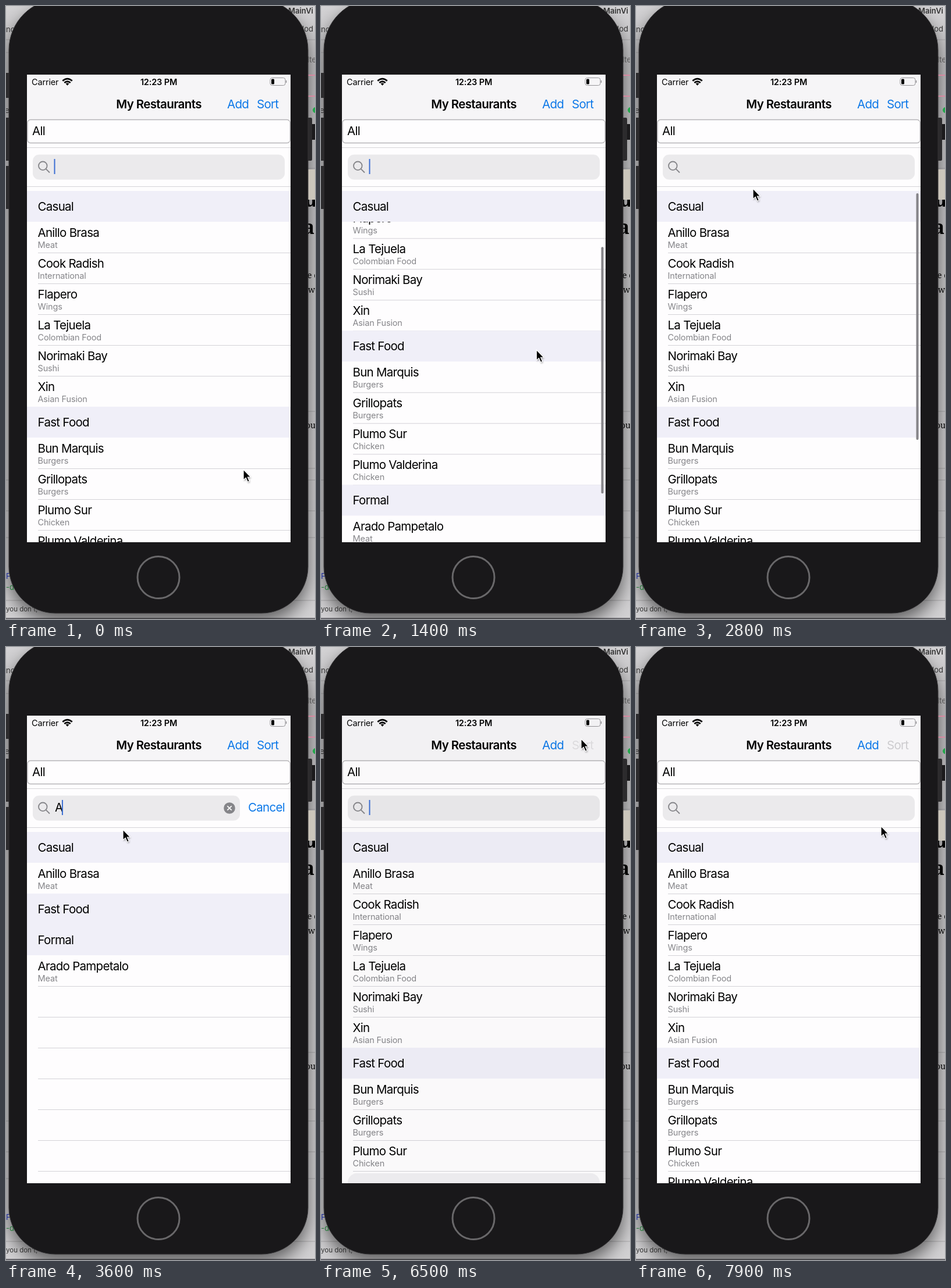
Write an HTML page that moves like this. It is 531 by 1054 pixels and loops after 8 s.

```html
<!DOCTYPE html>
<html lang="en">
<head>
<meta charset="utf-8">
<title>Restaurant list</title>
<style>
  html, body { margin: 0; width: 100%; height: 100%; overflow: hidden; background: #c5c4c6; }
  svg { display: block; }
  text { font: 20.5px Inter, sans-serif; letter-spacing: -.72px; white-space: pre; }
  .bold { font-weight: 600; letter-spacing: -.6px; }
  .small { font-size: 14.5px; letter-spacing: -.15px; }
  .sub { fill: #858589; }
  .link { fill: #0c78e8; }
  .mid { text-anchor: middle; }
  .serif { font: bold 32px "Noto Serif", serif; }
  .note { font: 14px "Noto Serif", serif; letter-spacing: 0; }
  .ui { font-size: 13px; letter-spacing: 0; fill: #333; }
</style>
</head>
<body>
<svg id="stage" width="531" height="1054" viewBox="0 0 531 1054">
  <defs>
    <linearGradient id="desk" x2="0" y2="1">
      <stop stop-color="#d3d2d4"/><stop offset=".1" stop-color="#c2c1c3"/>
      <stop offset=".7" stop-color="#cfced0"/><stop offset="1" stop-color="#d2d1d3"/>
    </linearGradient>
    <filter id="blur" x="-20%" y="-20%" width="140%" height="140%"><feGaussianBlur stdDeviation="15"/></filter>
    <filter id="soft" x="-50%" y="-50%" width="200%" height="200%"><feGaussianBlur stdDeviation="1.4"/></filter>
    <path id="body" d="M5 76A88 88 0 0 1 93 -12H431A88 88 0 0 1 519 76V964A80 80 0 0 1 439 1044H85A80 80 0 0 1 5 964Z"/>
  </defs>

  <!-- desktop behind the simulator -->
  <rect width="531" height="1054" fill="url(#desk)"/>
  <path d="M0 58H531M0 80H30M519 279H531M519 697H531M519 795H531M0 815H531M0 868H531M0 914H531M0 1022H531" stroke="#aaa9ab"/>
  <path d="M0 1053H531" stroke="#6c6b70" stroke-width="2"/>
  <use href="#body" y="14" opacity=".55" filter="url(#blur)"/>
  <path d="M519 119H531M519 155H531" stroke="#d887a0" stroke-width="2"/>
  <circle cx="532" cy="179" r="5" fill="#21a74a"/>
  <path d="M526 203H531V230H526Z" fill="#1b1a1c"/>
  <text class="ui bold" x="485" y="13">MainVi</text>
  <text class="ui" x="509" y="44">lod</text>
  <text class="ui" x="518" y="97" opacity=".7">lte</text>
  <text class="ui" x="0" y="45">no</text>
  <text class="ui" x="-2" y="184">e</text>
  <text class="serif" x="513" y="345">u</text>
  <rect x="519" y="281" width="12" height="52" fill="#cbc6bb"/>
  <text class="serif" x="511" y="392">a</text>
  <text class="note" x="518" y="468">e c</text>
  <text class="note" x="519" y="493">w</text>
  <text class="note" x="515" y="726">ou</text>
  <text class="ui" x="0" y="985" style="fill:#1a2a9a">F</text>
  <text class="ui" x="0" y="1004" style="fill:#247a38">-d</text>
  <text class="ui" x="0" y="1041" style="font-size:11.5px">you don't,</text>

  <!-- phone -->
  <path d="M0 115H7V158H0ZM0 192H7V266H0ZM0 275H7V349H0ZM517 192H524Q526 192 526 195V263Q526 266 524 266H517Z" fill="#2c2b2d"/>
  <use href="#body" fill="#19181a" stroke="#343335"/>
  <circle cx="262" cy="982.500" r="36" fill="none" stroke="#69686a" stroke-width="3"/>

  <svg x="36" y="118" width="453" height="804" viewBox="36 118 453 804">
    <rect x="36" y="118" width="453" height="804" fill="#fefdfe"/>
    <rect x="36" y="118" width="453" height="77" fill="#f6f5f7"/>
    <text class="small" x="44" y="135.500">Carrier</text>
    <g fill="none" stroke="#000" stroke-width="2.700">
      <path d="M97.300 128.700Q105.500 121.600 113.700 128.700M100.300 132Q105.500 127.500 110.700 132"/>
      <path d="M102.600 133.600Q105.500 131.600 108.400 133.600L105.500 136.800Z" fill="#000" stroke="none"/>
    </g>
    <text class="bold small mid" x="262.500" y="135.500">12:23 PM</text>
    <rect x="454" y="123.500" width="26" height="13" rx="3.500" fill="none" stroke="#969598"/>
    <rect x="456" y="125.500" width="5" height="9" rx="1.500"/>
    <path d="M481.500 128V132" stroke="#969598" stroke-width="1.500"/>
    <text class="bold mid" x="262.500" y="176">My Restaurants</text>
    <text id="add" x="380" y="176">Add</text>
    <text id="sort" x="431" y="176">Sort</text>

    <rect x="37" y="195.500" width="451" height="40" rx="5" fill="#fefdfe" stroke="#b4b3b6" stroke-width="1.300"/>
    <text x="45" y="222">All</text>
    <path d="M36 243.500H489M36 310.500H489" stroke="#d5d4d8"/>
    <rect id="field" x="46" y="255.500" height="43" rx="11" fill="#ebeaec"/>
    <g fill="none" stroke="#858589" stroke-width="1.800">
      <circle cx="63.300" cy="274.800" r="7.300"/><path d="M68.600 280.200L75 286.500"/>
    </g>
    <text id="query" x="84" y="283"></text>
    <rect id="caret" y="263" width="2" height="26" fill="#3c6fd2"/>
    <g id="clear">
      <circle cx="384" cy="277" r="9.800" fill="#858589"/>
      <path d="M380.300 273.300L387.700 280.700M387.700 273.300L380.300 280.700" stroke="#fff" stroke-width="1.700"/>
    </g>
    <text id="cancel" class="link" x="416" y="283">Cancel</text>

    <svg x="36" y="318" width="453" height="604" viewBox="36 318 453 604">
      <g id="list"></g>
      <g id="sticky"></g>
      <rect id="bar" x="481.500" width="4" rx="2" fill="#858488"/>
    </svg>

    <rect id="dim" x="36" y="118" width="453" height="804"/>
    <g id="sheet">
      <rect x="46" y="922" width="433" height="139" rx="16" fill="#ecebee"/>
      <path d="M46 991.500H479" stroke="#c4c3c8"/>
      <rect x="46" y="1071" width="433" height="69" rx="16" fill="#fefdfe"/>
      <text class="link mid" x="262.500" y="964">By Name</text>
      <text class="link mid" x="262.500" y="1033">By Category</text>
      <text class="link mid bold" x="262.500" y="1113">Cancel</text>
    </g>
  </svg>

  <g id="cursor">
    <path d="M0 0V18L4.200 14.200L7.300 21.300L10.300 20L7.300 13H12.700Z" transform="translate(1 2)" opacity=".4" filter="url(#soft)"/>
    <path d="M0 0V18L4.200 14.200L7.300 21.300L10.300 20L7.300 13H12.700Z" stroke="#fff" stroke-width="1.200"/>
  </g>
</svg>

<script>
const LOOP = 8000, ROW = 53, TOP = 318, MAX_SCROLL = 244;
const SECTIONS = {
  Casual: [['Anillo Brasa', 'Meat'], ['Cook Radish', 'International'], ['Flapero', 'Wings'],
    ['La Tejuela', 'Colombian Food'], ['Norimaki Bay', 'Sushi'], ['Xin', 'Asian Fusion']],
  'Fast Food': [['Bun Marquis', 'Burgers'], ['Grillopats', 'Burgers'],
    ['Plumo Sur', 'Chicken'], ['Plumo Valderina', 'Chicken']],
  Formal: [['Arado Pampetalo', 'Meat'], ['Cocina Morvelli', 'International'], ['Dorelo', 'International']]
};
const el = Object.fromEntries([...document.querySelectorAll('[id]')].map(e => [e.id, e]));
const set = (e, attrs) => { for (const k in attrs) e.setAttribute(k, attrs[k]); };

const smooth = p => p * p * (3 - 2 * p);
const easeOut = p => 1 - (1 - p) ** 3;
const ramp = (t, from, to) => Math.min(1, Math.max(0, (t - from) / (to - from)));
const pulse = (t, a, b, c, d) => smooth(ramp(t, a, b)) - smooth(ramp(t, c, d));

// Keys are [time, ...values]; each stretch between two keys is eased.
function track(t, keys, ease) {
  const i = keys.findIndex(k => k[0] > t);
  if (i === 0) return keys[0].slice(1);
  if (i < 0) return keys.at(-1).slice(1);
  const a = keys[i - 1], b = keys[i], p = ease(ramp(t, a[0], b[0]));
  return a.slice(1).map((v, j) => v + (b[j + 1] - v) * p);
}

const SCROLL = [[100, 0], [800, 253], [1100, MAX_SCROLL], [1200, MAX_SCROLL], [2270, 0]];
const CURSOR = [[100, 408, 797], [800, 381, 750], [1250, 370, 570], [1700, 371, 651], [1900, 371, 651],
  [2700, 201, 314], [5350, 201, 314], [5700, 447, 272], [5850, 447, 272], [6200, 447, 158],
  [6700, 447, 158], [7300, 421, 308]];

const header = (name, y) =>
  `<rect x="36" y="${y}" width="453" height="${ROW}" fill="#f0eff8"/><text x="54.500" y="${y + 34}">${name}</text>`;
const rule = y => `<path d="M55 ${y + .5}H489" stroke="#d3d2d7"/>`;

function listMarkup(query) {
  let y = TOP, html = '';
  for (const [name, places] of Object.entries(SECTIONS)) {
    html += header(name, y);
    y += ROW;
    for (const [title, kind] of places.filter(p => p[0].startsWith(query))) {
      html += rule(y + ROW) + `<text x="54.500" y="${y + 26}">${title}</text>` +
        `<text class="small sub" x="54.500" y="${y + 45}">${kind}</text>`;
      y += ROW;
    }
  }
  for (; y < 922; y += ROW) html += rule(y + ROW);
  return html;
}

function caretOpacity(t) {
  if (t > 6600) return 0;
  if (t > 3250 && t < 4250) return 1;
  const p = t % 1000;
  return 1 - ramp(p, 610, 790) + ramp(p, 820, 900);
}

let shown;
function draw(t) {
  const query = t < 3300 || t >= 5800 ? '' : t < 3950 ? 'A' : 'An';
  if (query !== shown) {
    el.list.innerHTML = listMarkup(query);
    el.query.textContent = shown = query;
  }

  const [scroll] = track(t, SCROLL, easeOut);
  const inside = Math.min(scroll, MAX_SCROLL);
  set(el.list, { transform: `translate(0 ${-scroll})` });
  set(el.bar, { y: 322 + inside * .705 + scroll - inside, height: 424 - (scroll - inside),
    opacity: ramp(t, 100, 180) - ramp(t, 3300, 3550) });

  const editing = pulse(t, 3300, 3600, 5800, 6100);
  set(el.field, { width: 433 - 77 * editing });
  set(el.cancel, { opacity: editing, transform: `translate(${30 * (1 - editing)} 0)` });
  set(el.clear, { opacity: query ? 1 : 0, transform: `translate(${77 * (1 - editing)} 0)` });
  set(el.caret, { x: 82.500 + (query ? el.query.getComputedTextLength() : 0), opacity: caretOpacity(t) });

  const sheet = pulse(t, 6420, 6900, 7400, 7850);
  set(el.dim, { opacity: .2 * sheet });
  set(el.sheet, { transform: `translate(0 ${-228 * sheet})` });
  set(el.add, { fill: sheet > .1 ? '#9b9a9d' : '#0c78e8' });
  set(el.sort, { fill: t < 6300 ? '#0c78e8' : t < 6700 ? '#dfdee1' : '#cccbce' });

  set(el.cursor, { transform: `translate(${track(t, CURSOR, smooth)})` });
}

el.sticky.innerHTML = header('Casual', TOP);
const start = performance.now();
(function frame() {
  draw((performance.now() - start) % LOOP);
  requestAnimationFrame(frame);
})();
</script>
</body>
</html>
```
